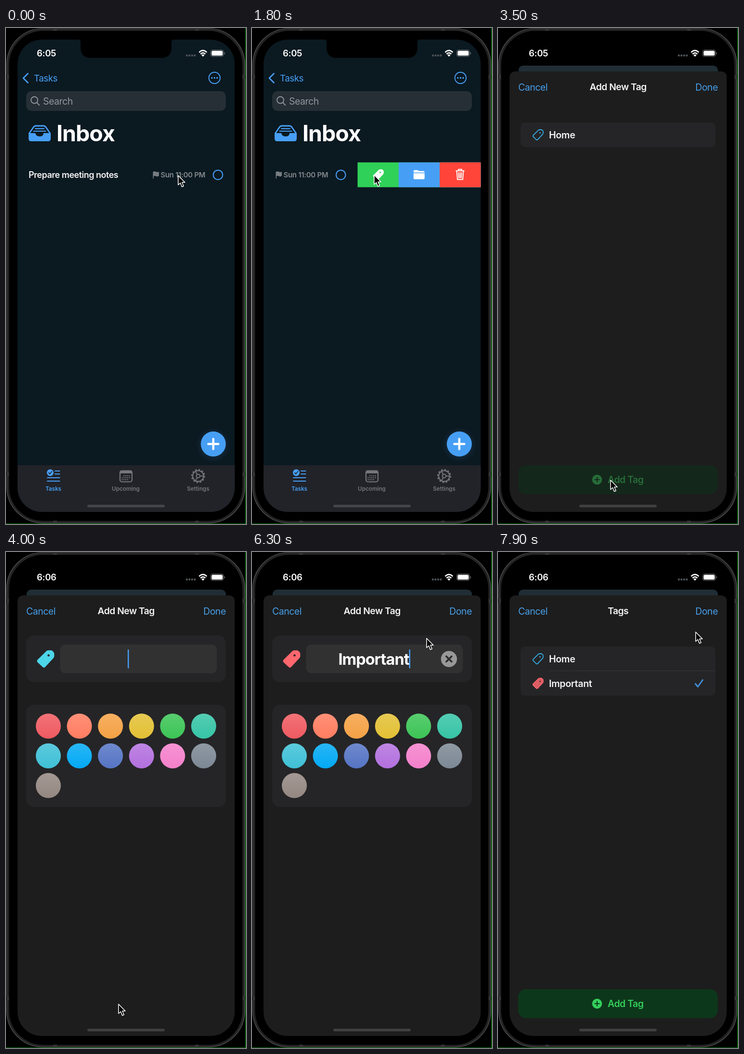
Recreate the animation shown at these times as an HTML page. Size 499 by 1029 pixels, loop 8000 ms.

```html
<!DOCTYPE html>
<html lang="en">
<head>
<meta charset="utf-8">
<title>Tagging a task</title>
<style>
  html, body { margin: 0; width: 100%; height: 100%; overflow: hidden; background: #000; }
  svg { display: block; width: 499px; height: 1029px; --tint: #479ff5; }
  text { font: 400 19.5px Inter, sans-serif; letter-spacing: -.5px; fill: #f4f4f5; }
  .semi { font-weight: 600; }
  .mid { text-anchor: middle; }
  .end { text-anchor: end; }
  .row { font-weight: 600; font-size: 19.6px; letter-spacing: -.35px; }
  .title { font-weight: 600; font-size: 19.3px; text-anchor: middle; }
  .tab { font-weight: 600; font-size: 11.7px; letter-spacing: 0; text-anchor: middle; fill: #74767a; }
  .blue { fill: #479fe9; }
  .tint { fill: var(--tint); }
  .tintLine { stroke: var(--tint); }
  .line { fill: none; stroke-linecap: round; stroke-linejoin: round; }
  .butt { stroke-linecap: butt; }
</style>
</head>
<body>
<svg viewBox="0 0 499 1029">
  <defs>
    <clipPath id="screenClip"><rect x="24" y="24" width="451.5" height="980" rx="50"/></clipPath>
    <clipPath id="pageClip"><rect id="pageShape" x="24" y="24" width="452" height="980" rx="50"/></clipPath>
    <linearGradient id="shine" x1="0" y1="0" x2="0" y2="1">
      <stop offset="0" stop-color="#fff" stop-opacity=".15"/>
      <stop offset="1" stop-color="#fff" stop-opacity="0"/>
    </linearGradient>
    <radialGradient id="glow">
      <stop offset=".7" stop-color="#479ff5" stop-opacity=".08"/>
      <stop offset="1" stop-color="#479ff5" stop-opacity="0"/>
    </radialGradient>
    <path id="tagShape" d="M20 1.2Q21.5 0 24 0H29Q31 0 32.3 1.3L34.7 3.7Q36 5 36 7V12Q36 14.5 34.2 16.3L17 34.8Q14.5 37 12 34.8L1.5 25Q-1 22 1.5 19.3Z"/>
  </defs>

  <rect width="499" height="1029"/>

  <!-- Device frame -->
  <rect x="4" y="3.5" width="490" height="1021.5" rx="73" fill="none" stroke="#232324" stroke-width="5"/>
  <rect x="1.5" y="1" width="495" height="1026" rx="75" fill="none" stroke="#58585a" stroke-width="1.2"/>
  <path d="M1 97h5v9h-5zM1 922h5v8h-5zM492 97h5v9h-5zM492 922h5v8h-5zM98 1h8v5h-8zM393 1h8v5h-8zM98 1022h8v5h-8zM393 1022h8v5h-8z" fill="#343435"/>
  <path d="M497.5 0H499V1029H0V1028H497.5Z" fill="#0b7a12"/>

  <g clip-path="url(#screenClip)">
    <!-- Inbox page -->
    <g id="page"><g clip-path="url(#pageClip)">
      <rect x="24" y="24" width="452" height="980" fill="#0b1921"/>
      <path class="line tintLine" d="M45.5 94.5l-9.5 9.5 9.5 9.5" stroke-width="2.7"/>
      <text class="tint" x="58" y="110.5" style="font-size:18.8px">Tasks</text>
      <circle class="line tintLine" cx="433.5" cy="103.5" r="11.7" stroke-width="1.9"/>
      <g class="tint"><circle cx="428" cy="103.5" r="1.7"/><circle cx="433.5" cy="103.5" r="1.7"/><circle cx="439" cy="103.5" r="1.7"/></g>

      <rect x="42" y="131" width="415" height="41" rx="11" fill="#262f36"/>
      <g class="line" stroke="#92989d" stroke-width="1.8"><circle cx="59" cy="149.5" r="7"/><path d="M64.3 155l5 5"/></g>
      <text x="77" y="158.5" style="fill:#92989d">Search</text>

      <path class="tint" d="M47 218H61Q62 225 70 225T78 218H93V229.5Q93 235 87.5 235H52.5Q47 235 47 229.5Z"/>
      <path class="line tintLine" d="M48.3 218.5L57 206Q59 203 62 203H78Q81 203 83 206L91.7 218.5" stroke-width="2.8"/>
      <path class="line tintLine" d="M61 208.8H79M57.5 214H82.5" stroke-width="2.2"/>
      <text x="105" y="235" style="font-weight:700;font-size:46.5px;letter-spacing:-1px;fill:#fff">Inbox</text>

      <g id="task">
        <text class="semi" x="47" y="311" style="font-size:18px">Prepare meeting notes</text>
        <path d="M305.5 298.5Q309 296.5 312 298.2T318 298V307Q315 308.6 312 307.4T307 307.3V312.5H305.5Z" fill="#777d81"/>
        <text class="semi" x="321.5" y="310.3" style="font-size:15px;letter-spacing:-.3px;fill:#858a8e">Sun 11:00 PM</text>
        <circle class="line tintLine" cx="440.7" cy="304.7" r="9.8" stroke-width="2"/>
      </g>

      <g id="actTag" fill="#fff">
        <rect width="260" height="51.5" fill="#30d158"/>
        <use href="#tagShape" transform="translate(32 14.5) scale(.62)"/>
        <circle cx="47.2" cy="20.8" r="1.6" fill="#30d158"/>
      </g>
      <g id="actMove">
        <rect width="260" height="51.5" fill="#479ff5"/>
        <path d="M31 20V18.5Q31 16 33.5 16H38.5Q40 16 41 17T43.5 18H51.5Q54 18 54 20.5V21H31ZM31 22.5H54V32.5Q54 35 51.5 35H33.5Q31 35 31 32.5Z" fill="#fff"/>
      </g>
      <g id="actDelete">
        <rect width="260" height="51.5" fill="#ff453a"/>
        <path class="line" d="M34 17.5H51M39 17V14.5H46V17M35.5 18L37 35.5H48L49.5 18M39.3 21.5L39.8 32M42.5 21.5V32M45.7 21.5L45.2 32" stroke="#fff" stroke-width="1.9"/>
      </g>

      <circle cx="431" cy="865" r="37" fill="url(#glow)"/>
      <circle class="tint" cx="431" cy="863" r="26"/>
      <path class="line" d="M420.5 863H441.5M431 852.5V873.5" stroke="#fff" stroke-width="4.5"/>

      <rect x="24" y="907" width="452" height="98" fill="#212329"/>
      <circle class="tint" cx="92" cy="922.5" r="7"/>
      <path class="line" d="M88.8 922.7l2.3 2.5 4.2-5.2" stroke="#212329" stroke-width="1.7"/>
      <path class="line tintLine" d="M102 919H111.5M102 925.3H111.5M86 933H111.5M86 940H111.5" stroke-width="2"/>
      <text class="tab" x="98.5" y="960" style="fill:var(--tint)">Tasks</text>
      <g fill="#74767a">
        <rect x="237" y="918.5" width="25" height="23" rx="4" fill="none" stroke="#74767a" stroke-width="2.2"/>
        <path d="M237 918.5H262V924H237Z"/>
        <g id="days"></g>
      </g>
      <text class="tab" x="249" y="960">Upcoming</text>
      <g class="line" stroke="#74767a" stroke-width="2">
        <circle cx="399.5" cy="929.5" r="11.3"/>
        <circle class="butt" cx="399.5" cy="929.5" r="13.2" stroke-width="2.6" stroke-dasharray="3.46 3.46"/>
        <circle cx="399.5" cy="929.5" r="3.7"/>
        <path d="M403 929.5H410.5M397.7 926.3L394 919.8M397.7 932.7L394 939.2"/>
      </g>
      <text class="tab" x="399.5" y="960">Settings</text>
      <rect id="veil" x="24" y="24" width="452" height="980" fill="#27343c"/>
    </g></g>

    <!-- Tags sheet -->
    <g id="sheet">
      <rect x="24" y="90" width="452" height="1000" rx="12" fill="#1d1d1d"/>
      <text class="blue" x="42" y="129.5">Cancel</text>
      <text class="title" id="title" x="249.7" y="129">Tags</text>
      <text class="blue end" id="done" x="457" y="129.5">Done</text>

      <g id="list">
        <rect id="listCard" x="47" y="196" width="405" height="51" rx="9" fill="#252527"/>
        <use href="#tagShape" transform="translate(72.5 211) scale(.59)" fill="none" stroke="#35aee6" stroke-width="3"/>
        <circle cx="87.3" cy="217.5" r="1.4" fill="#35aee6"/>
        <text class="row" x="106" y="228.5">Home</text>
        <g id="newRow">
          <path d="M106 246.5H452" stroke="#37373a"/>
          <use href="#tagShape" transform="translate(72.5 262) scale(.59)" fill="none" stroke="#f8666d" stroke-width="3"/>
          <circle cx="87.3" cy="268.5" r="1.4" fill="#f8666d"/>
          <g id="picked">
            <use href="#tagShape" transform="translate(72 261.5) scale(.62)" fill="#f8666d"/>
            <circle cx="87.3" cy="268.5" r="1.4" fill="#252527"/>
            <path class="line" d="M410.5 273.5L415.5 279.5L425.5 265.5" stroke="#479ff5" stroke-width="3"/>
          </g>
          <text class="row" x="106" y="279.5">Important</text>
        </g>
      </g>

      <g id="add">
        <rect x="42" y="907" width="415" height="60" rx="16" fill="#0d371b"/>
        <circle cx="206" cy="937" r="10.3" fill="#34cf5b"/>
        <path class="line" d="M201.5 937H210.5M206 932.5V941.5" stroke="#0d371b" stroke-width="2.2"/>
        <text class="semi" x="228" y="943.5" style="fill:#34cf5b">Add Tag</text>
      </g>

      <g id="edit">
        <rect x="42" y="173" width="415" height="97" rx="16" fill="#252527"/>
        <use id="bigTag" href="#tagShape" x="64.3" y="204"/>
        <circle cx="88.5" cy="214.5" r="2.3" fill="#252527"/>
        <rect x="112.5" y="192" width="326" height="59.5" rx="11" fill="#313131"/>
        <text class="mid" id="name" x="253" y="234" style="font-weight:700;font-size:32.5px;letter-spacing:-1px;fill:#fff"></text>
        <rect id="caret" y="202" width="2.5" height="39.5" rx="1" fill="#479ff5"/>
        <g id="clear">
          <circle cx="409.5" cy="222" r="16.7" fill="#989898"/>
          <path class="line" d="M404 216.5L415 227.5M415 216.5L404 227.5" stroke="#2d2d2d" stroke-width="3.8"/>
        </g>
        <rect x="42" y="317" width="415" height="212" rx="16" fill="#252527"/>
        <g id="swatches"></g>
      </g>
    </g>

    <path id="notch" d="M150 24Q155 24 155 29V40Q155 62 177 62H322Q344 62 344 40V29Q344 24 349 24Z"/>
    <rect id="homeBar" x="169" y="989" width="161" height="5.5" rx="2.75"/>
  </g>

  <!-- Status bar -->
  <text class="semi" id="clock" x="64" y="58.5" style="font-size:18.5px;letter-spacing:-.3px;fill:#fff">6:05</text>
  <g fill="#4b5054"><circle cx="376" cy="57" r="2.2"/><circle cx="381.5" cy="57" r="2.2"/><circle cx="387" cy="57" r="2.2"/><circle cx="392.5" cy="57" r="2.2"/></g>
  <path d="M401.5 50.5Q409.5 42.7 417.5 50.5M404.5 54Q409.5 49.3 414.5 54" fill="none" stroke="#fff" stroke-width="2.5"/>
  <path d="M406.3 56.2Q409.5 53.3 412.7 56.2L409.5 59.5Z" fill="#fff"/>
  <rect x="425.7" y="45.5" width="26.5" height="13.5" rx="4" fill="none" stroke="#74797c" stroke-width="1.1"/>
  <rect x="427.5" y="47.3" width="23" height="10" rx="2.5" fill="#fff"/>
  <path d="M453.7 50V55Q455.3 54 455.3 52.5T453.7 50Z" fill="#74797c"/>

  <path id="cursor" d="M0 0V19.5L4.5 15.5L7.7 23.5L11.2 22L8 14.3H14Z" stroke="#fff" stroke-width="1.5" stroke-linejoin="round"/>
</svg>

<script>
const LOOP = 8000, STEP = 100;
const svg = document.querySelector('svg');
const ui = {};
document.querySelectorAll('[id]').forEach(el => ui[el.id] = el);

const set = (el, attrs) => { for (const k in attrs) el.setAttribute(k, attrs[k]); };
const add = (parent, tag, attrs) => {
  const el = document.createElementNS('http://www.w3.org/2000/svg', tag);
  set(el, attrs);
  parent.append(el);
};
const clamp = v => Math.max(0, Math.min(1, v));
const ramp = (t, a, b) => clamp((t - a) / (b - a));
const smooth = v => v * v * (3 - 2 * v);
const mix = (a, b, p) => a + (b - a) * p;
const move = (el, x, y, s = 1) => el.setAttribute('transform', `translate(${x} ${y}) scale(${s})`);

// Value of a track of [time, ...values] keys, eased between neighbours.
function track(keys, t) {
  const i = keys.findIndex(k => k[0] > t);
  if (i === 0) return keys[0].slice(1);
  if (i < 0) return keys[keys.length - 1].slice(1);
  const a = keys[i - 1], b = keys[i], p = smooth(ramp(t, a[0], b[0]));
  return a.slice(1).map((v, j) => mix(v, b[j + 1], p));
}

const pointer = [
  [0, 358, 306], [950, 358, 306], [1400, 254, 305], [2050, 254, 305],
  [2400, 260, 354], [2600, 260, 375], [3200, 234, 938], [5150, 234, 938],
  [5400, 130, 484], [5700, 84, 358], [5950, 84, 358], [6300, 363, 179],
  [6550, 430, 118], [6900, 430, 118], [7250, 405, 266], [7550, 405, 266],
  [7900, 411, 166]
];
const swipe = [[950, 0], [1350, 104], [1700, 256]];

const colors = ['#ef5a60', '#ff7d60', '#f5a145', '#e3c035', '#3cc456', '#36c4a6',
  '#3fc0d6', '#03a9f4', '#5574c4', '#b370de', '#f480cb', '#7c8894', '#948781'];
colors.forEach((fill, i) => {
  const at = { cx: 88 + i % 6 * 64.6, cy: 361.2 + Math.floor(i / 6) * 61.7, r: 26 };
  add(ui.swatches, 'circle', { ...at, fill });
  add(ui.swatches, 'circle', { ...at, fill: 'url(#shine)' });
});
for (let i = 1; i < 14; i++)
  add(ui.days, 'circle', { cx: 241.5 + i % 5 * 3.8, cy: 929 + Math.floor(i / 5) * 4, r: 1.2 });

function drawSwipe(t) {
  const shift = track(swipe, t)[0];
  move(ui.task, -shift, 0);
  [ui.actTag, ui.actMove, ui.actDelete].forEach((el, i) =>
    move(el, 475.5 - shift * (1 - i / 3), 278.8));
}

// The sheet rises on a critically damped spring while the page shrinks behind it.
function drawSheet(t) {
  const k = Math.max(0, t - 2000) * .0113;
  const p = t >= 2800 ? 1 : 1 - (1 + k) * Math.exp(-k);
  move(ui.sheet, 0, (1 - p) * 918);
  const s = mix(1, .918, p), x = mix(24, 42.5, p), y = mix(24, 78, p);
  move(ui.page, x - 24 * s, y - 24 * s, s);
  set(ui.pageShape, { rx: mix(50, 11, p) });
  set(ui.veil, { opacity: .75 * p });
  set(ui.notch, { opacity: p > .1 ? 0 : 1 });
  set(ui.homeBar, { fill: p > .5 ? '#404041' : '#43454a' });
  svg.style.setProperty('--tint', p > .3 ? '#9a9a9a' : '#479ff5');
}

function drawTags(t) {
  const editing = t >= 3500 && t < 6800;
  const created = t >= 6700;
  const back = ramp(t, 6700, 7000);
  const leaving = 1 - ramp(t, 3500, 3700);
  const pressed = mix(1, .45, ramp(t, 3400, 3500));
  ui.title.textContent = editing ? 'Add New Tag' : 'Tags';
  set(ui.list, { opacity: created ? back : leaving });
  set(ui.add, { opacity: created ? back : leaving * pressed });
  set(ui.edit, { opacity: ramp(t, 3500, 3800) * (1 - ramp(t, 6600, 6800)) });
  set(ui.done, { opacity: t >= 6600 && t < 6800 ? .4 : 1 });
  set(ui.listCard, { height: created ? 102 : 51 });
  set(ui.newRow, { opacity: created ? 1 : 0 });
  set(ui.picked, { opacity: .87 * ramp(t, 7500, 7900) });
}

function drawEditor(t) {
  const count = Math.max(0, Math.min(9, Math.floor((t - 4050) / 130)));
  ui.name.textContent = 'Important'.slice(0, count);
  const half = count ? ui.name.getComputedTextLength() / 2 : 0;
  set(ui.caret, { x: 253 + half });
  set(ui.clear, { opacity: count ? 1 : 0 });
  const p = ramp(t, 5750, 5950);
  const rgb = [mix(77, 255, p), mix(213, 103, p), mix(232, 110, p)].map(Math.round);
  set(ui.bigTag, { fill: `rgb(${rgb})` });
}

function draw(t) {
  drawSwipe(t);
  drawSheet(t);
  drawTags(t);
  drawEditor(t);
  ui.clock.textContent = t < 4000 ? '6:05' : '6:06';
  move(ui.cursor, ...track(pointer, t));
}

const start = performance.now();
function tick() {
  const t = (performance.now() - start) % LOOP;
  draw(Math.floor(t / STEP) * STEP);
  requestAnimationFrame(tick);
}
tick();
</script>
</body>
</html>
```
